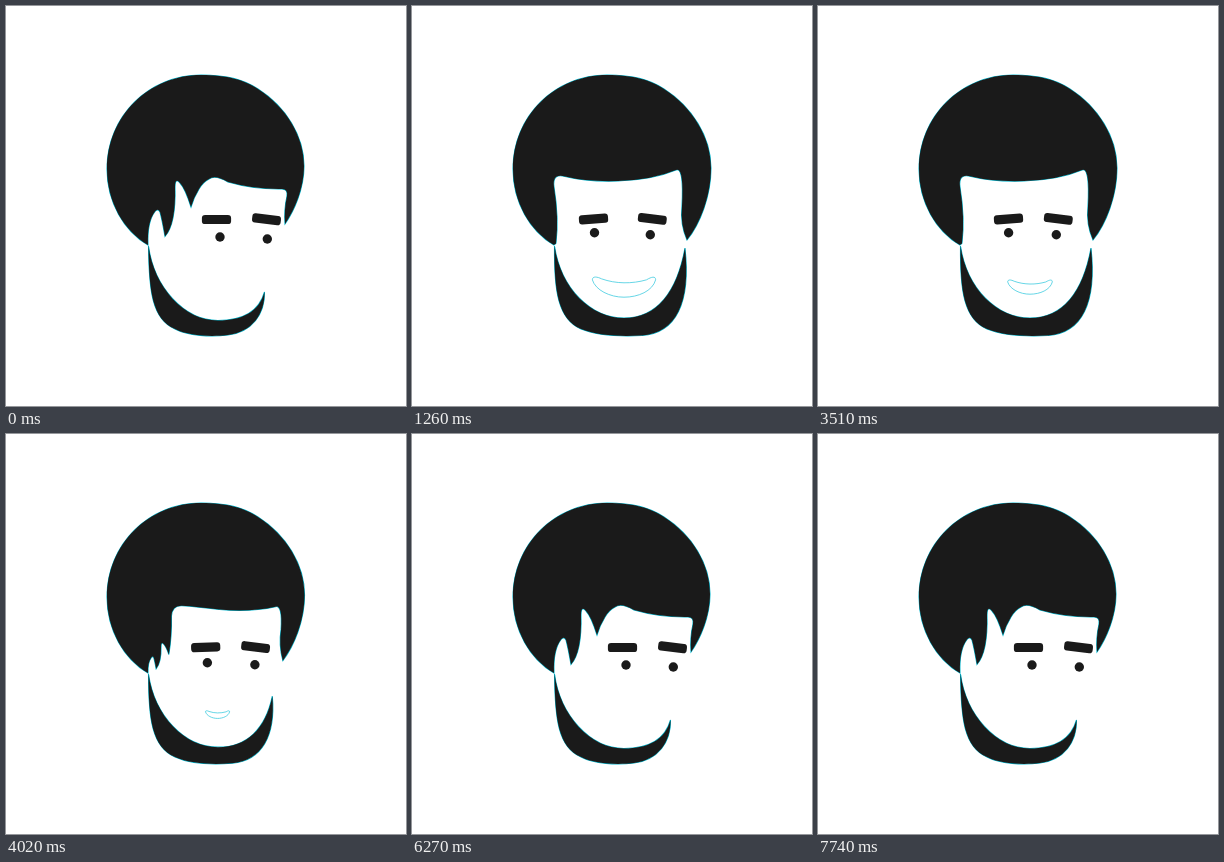
Recreate the animation shown at these times as an HTML page. Size 400x400 px, loop 9.87 s.

```html
<!DOCTYPE html>
<html lang="en">
<head>
<meta charset="utf-8">
<title>Turning head</title>
<style>
  html, body { margin: 0; width: 100%; height: 100%; overflow: hidden; background: #fff; }
  svg { display: block; width: 100%; height: 100%; }
  .ink { fill: #1a1a1a; }
  .edge { stroke: #00b4cc; stroke-width: 1.1; paint-order: stroke; }
  #smile { fill: #fff; stroke: #35c8de; stroke-width: .75; vector-effect: non-scaling-stroke; }
</style>
</head>
<body>
<svg viewBox="0 0 400 400">
  <path id="hair" class="ink edge"/>
  <path id="beard" class="ink edge"/>
  <path id="smile" d="M-31-7C-31-11-26-10-22-8C-8-3 8-3 22-7C27-10 31-11 31-7C28 4 14 10 0 10C-14 10-28 3-31-7Z"/>
  <rect id="browL" class="ink" x="-14.6" y="-4.6" width="29.2" height="9.2" rx="3.2"/>
  <rect id="browR" class="ink" x="-14.4" y="-4.6" width="28.8" height="9.2" rx="3.2"/>
  <circle id="eyeL" class="ink" r="4.7"/>
  <circle id="eyeR" class="ink" r="4.7"/>
</svg>
<script>
const LOOP = 9870, STEP = 30;
const $ = id => document.getElementById(id);

// Each shape has a side pose and a front pose with the same commands.
const crown = 'M142 239 C118 225 101 196 101 163 C101 110 143 69 195 69 C222 69 238 74 252 83 ';
const hair = [
  crown + 'C280 101 298 130 298 160 C298 183 288 205 279 218 ' +
  'Q278 203 281 190 Q282 183 276 183 Q248 183.5 222 176 Q209 168.5 203 173 ' +
  'Q197 176 193 183 Q188 191 185 201 Q179 182 174 177 Q169 171 169 181 ' +
  'Q170 218 159 230.5 Q156 213 154 206 Q152 202 149 205.5 Q141 216 142 239Z',
  crown + 'C280 101 299 131 299 162 C299 190 288 218 275 234 ' +
  'Q268 218 270 200 Q272 160 264 164 Q240 174 206 175 Q175 176 153 170.5 ' +
  'Q140 167 142 181 Q147 212 144 237 Q143.8 238 143.6 238 Q143.4 238 143.2 238 ' +
  'Q143 238 142.6 238.5 Q142.5 238.5 142.4 238.5 Q142.3 238.5 142.2 238.6 Q142 239 142 239Z'
];
const beard = [
  'M142.5 240 C143 285 146 313 169 323 C182 330 205 331 222 329 ' +
  'C246 326 259 308 258.5 286 C253 306 236 314.5 212 314.5 C178 314.5 148 281 142.5 240Z',
  'M142.5 240 C142 285 146 313 169 323 C186 330 208 330.5 230 329.5 ' +
  'C264 327 279 297 273 242 C265 286 245 312 212 312 C179 312 149 283 142.5 240Z'
];

const mix = (a, b, p) => a + (b - a) * p;
const ease = (t, from, to) => {
  const u = Math.min(1, Math.max(0, (t - from) / (to - from)));
  return u * u * (3 - 2 * u);
};

function morph([side, front], p) {
  const ends = front.match(/[\d.]+/g);
  let i = 0;
  return side.replace(/[\d.]+/g, n => mix(+n, +ends[i++], p).toFixed(2));
}

function place(id, x, y, turn = 0, scale = 1) {
  $(id).setAttribute('transform', `translate(${x} ${y}) rotate(${turn}) scale(${scale})`);
}

// Vertical brow wiggle, fading slightly.
function wiggle(t) {
  const u = (t - 6270) / 1470;
  return u <= 0 || u >= 1 ? 0 : -4.2 * (1 - .25 * u) * Math.sin(4 * Math.PI * u);
}

function draw(t) {
  const back = ease(t, 3580, 4510);
  const face = ease(t, 0, 570) * (1 - back);
  const jaw = ease(t, 0, 900) * (1 - back);
  const drift = 9 * ease(t, 1500, 3400) * (1 - back);
  const grin = (1.03 * ease(t, 600, 1300) - .31 * ease(t, 1350, 2000)) * (1 - back);
  const bob = wiggle(t);

  $('hair').setAttribute('d', morph(hair, face));
  $('beard').setAttribute('d', morph(beard, jaw));

  place('browL', mix(210.5, 181.5, face) + drift, mix(213.5, 213, face) + bob, -4 * face);
  place('browR', mix(260.5, 240.3, face), mix(213.3, 212.9, face) + bob, 7);
  place('eyeL', mix(214, 182.5, face) + drift * .9, mix(231, 226.8, face));
  place('eyeR', mix(261.3, 238.3, face), mix(233, 228.8, face));

  $('smile').style.display = grin > .02 ? '' : 'none';
  place('smile', 212 - back, 281 - back, 0, Math.max(grin, .02));
}

function tick() {
  const t = performance.now() % LOOP;
  draw(Math.floor(t / STEP) * STEP);
  requestAnimationFrame(tick);
}
tick();
</script>
</body>
</html>
```
